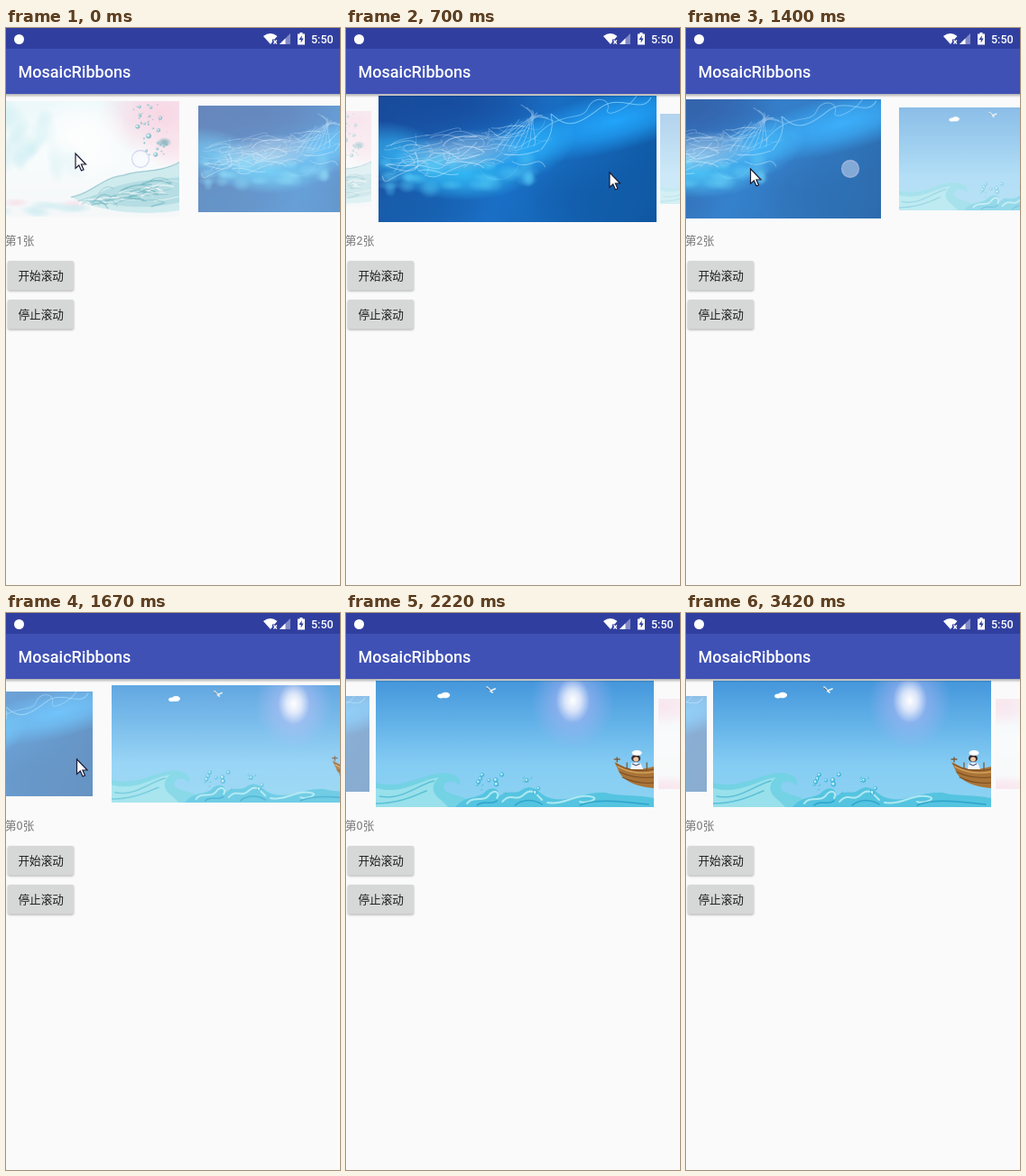
These frames come from a looping animation (370x617 px, 3520 ms). An HTML page with a canvas:

```html
<!DOCTYPE html>
<html lang="zh">
<head>
<meta charset="utf-8">
<title>MosaicRibbons</title>
<style>
  html, body { margin: 0; width: 100%; height: 100%; overflow: hidden; background: #fafafa; }
  canvas, svg { position: absolute; left: 0; top: 0; width: 370px; height: 617px; }
  text { font-family: Roboto, 'Noto Sans CJK SC', 'Noto Sans CJK', sans-serif; }
  .button rect { fill: #d6d7d7; filter: drop-shadow(0 1px 1px rgba(0, 0, 0, .3)); }
  .button text { font-size: 12.6px; fill: #1c1c1c; }
</style>
</head>
<body>
<canvas id="stage" width="370" height="617"></canvas>
<svg viewBox="0 0 370 617">
  <defs>
    <linearGradient id="shade" x2="0" y2="1">
      <stop stop-opacity=".3"/><stop offset="1" stop-opacity="0"/>
    </linearGradient>
  </defs>
  <rect y="73" width="370" height="4" fill="url(#shade)"/>
  <rect y="23" width="370" height="50" fill="#3f51b5"/>
  <rect width="370" height="23" fill="#303f9f"/>
  <g fill="#fff">
    <circle cx="14.5" cy="12.5" r="5.5"/>
    <path d="M285 9Q293 3 300.500 9L297.500 12.500H295V15.500L293 18Z"/>
    <path d="M296.500 13.500l3.500 4m0-4l-3.500 4" stroke="#fff" stroke-width="1.200"/>
    <path d="M303 18L315 6V18Z" opacity=".4"/>
    <path d="M303 18L309.500 11.500V18Z"/>
    <path d="M323 6.500h2.500V5h3v1.500H331V18.500h-8Z"/>
    <path d="M328 8l-3.500 5h2.200v3.500l3-5h-2.200Z" fill="#303f9f"/>
    <text x="338" y="17" font-size="12.500" font-weight="500">5:50</text>
    <text x="13.500" y="55" font-size="18" font-weight="500">MosaicRibbons</text>
  </g>
  <text id="label" x="-1" y="240" font-size="12.600" fill="#777">第1张</text>
  <g class="button">
    <rect x="2" y="258" width="73" height="32.500" rx="2"/>
    <text x="13.500" y="279">开始滚动</text>
  </g>
  <g class="button">
    <rect x="2" y="301" width="73" height="32.500" rx="2"/>
    <text x="13.500" y="322">停止滚动</text>
  </g>
</svg>
<script>
const LOOP = 3520, W = 308, H = 140, MID = 145;
const STEPS = [0, 130, 280, 430, 580, 700, 860, 1010, 1130, 1250, 1400,
  1520, 1670, 1820, 1950, 2100, 2220, 2340, 2490, 2610, 2760, 3420];
const POINTER = [[0, 77, 139], [280, 117, 148], [700, 292, 160], [860, 302, 160],
  [1130, 298, 159], [1250, 235, 158], [1400, 71.5, 156], [1670, 78.5, 162], [1820, 90, 170]];
const TOUCH = { 0: [149, 145, .12], 1250: [290, 157, .45], 1400: [182, 156, .45] };

const stage = document.getElementById('stage').getContext('2d');
const label = document.getElementById('label');
stage.imageSmoothingQuality = 'high';

function random(seed) {
  return () => (seed = (seed * 16807) % 2147483647) / 2147483647;
}

// Paints one card picture and offers small drawing helpers.
function picture(paint) {
  const canvas = document.createElement('canvas');
  canvas.width = W * 2;
  canvas.height = H * 2;
  const c = canvas.getContext('2d');
  c.scale(2, 2);
  c.lineCap = 'round';
  paint({
    wash(x, y, ...colors) {
      const g = c.createLinearGradient(0, 0, x, y);
      colors.forEach((col, i) => g.addColorStop(i / (colors.length - 1), col));
      c.fillStyle = g;
      c.fillRect(0, 0, W, H);
    },
    glow(x, y, rx, ry, color, alpha = 1, turn = 0) {
      c.save();
      c.translate(x, y);
      c.rotate(turn);
      c.scale(rx, ry);
      const g = c.createRadialGradient(0, 0, 0, 0, 0, 1);
      g.addColorStop(0, color);
      g.addColorStop(.45, color + 'b0');
      g.addColorStop(1, color + '00');
      c.globalAlpha = alpha;
      c.fillStyle = g;
      c.fillRect(-1, -1, 2, 2);
      c.restore();
    },
    fill(d, color, alpha = 1) {
      c.globalAlpha = alpha;
      c.fillStyle = color;
      c.fill(new Path2D(d));
      c.globalAlpha = 1;
    },
    line(d, color, width = 1, alpha = 1) {
      c.globalAlpha = alpha;
      c.strokeStyle = color;
      c.lineWidth = width;
      c.stroke(new Path2D(d));
      c.globalAlpha = 1;
    },
    dot(x, y, rx, color, alpha = 1, ry = rx) {
      c.globalAlpha = alpha;
      c.fillStyle = color;
      c.beginPath();
      c.ellipse(x, y, rx, ry, 0, 0, 7);
      c.fill();
      c.globalAlpha = 1;
    }
  });
  return canvas;
}

const water = picture(({ wash, glow, fill, line, dot }) => {
  const rnd = random(41);
  wash(0, H, '#e9f8fa', '#f8fcfd', '#f4f7f9');
  glow(8, 10, 60, 34, '#f8c8dc');
  glow(10, 138, 70, 20, '#f8c8dc');
  glow(285, 15, 75, 55, '#f9cfe0');
  glow(300, 55, 36, 30, '#fbdbe6', .8);
  for (let i = 0; i < 16; i++)
    glow(60 + rnd() * 120, rnd() * 75, 10 + rnd() * 24, 8 + rnd() * 14, '#bfeaf0', .6, rnd() * 3);
  for (let i = 0; i < 12; i++)
    glow(60 + rnd() * 130, 122 + rnd() * 16, 18, 6, i % 3 ? '#c5e9ee' : '#f5d7e2', .7);
  glow(190, 45, 60, 55, '#ffffff');
  fill('M178 116C205 110 216 92 240 90C262 82 282 88 308 74V132C270 138 215 136 178 116Z', '#bfe5ea', .85);
  fill('M200 118C230 98 262 96 308 92V122C270 132 230 128 200 118Z', '#8fcbd4', .55);
  for (let i = 0; i < 44; i++) {
    const x = 184 + rnd() * 95, rise = (x - 180) * .27, y = 118 - rnd() * rise + rnd() * 10;
    const dx = 14 + rnd() * 26;
    line(`M${x} ${y}q${dx / 2} ${-12 + rnd() * 12} ${dx} ${-7 + rnd() * 12}`,
      i % 3 ? '#4fa5b3' : '#ffffff', .5 + rnd() * 1.4, .65);
  }
  line('M178 116C205 110 216 92 240 90C262 82 282 88 308 74', '#68aebb', 1.2, .8);
  for (let i = 0; i < 42; i++) {
    const y = rnd() * 68, x = 262 + y * .3 + (rnd() - .4) * 36, r = .5 + rnd() * rnd() * 3.2;
    dot(x, y, r, '#4aa3b2', .75);
    if (r > 1.2) dot(x - r * .2, y - r * .2, r * .5, '#d8f3f5');
  }
  glow(290, 50, 9, 6, '#348d9e', .7);
});

const smoke = picture(({ wash, glow, line }) => {
  const rnd = random(77);
  wash(W, H, '#194a9a', '#1a70c6', '#0e559f');
  glow(80, 8, 120, 40, '#174a9c', .8);
  glow(262, 28, 125, 34, '#22a8ff', .95, -.25);
  glow(30, 125, 90, 25, '#1761ae', .8);
  glow(250, 115, 90, 42, '#125ca9', .8);
  glow(25, 68, 70, 36, '#35b2f2', .9, .3);
  glow(95, 86, 75, 30, '#32bcf7', .95);
  glow(165, 58, 58, 34, '#2bb0fa', .9, -.4);
  glow(92, 62, 75, 24, '#a8d6f3', .65, -.1);
  for (let i = 0; i < 26; i++)
    glow(8 + rnd() * 160, 70 + rnd() * 34, 6 + rnd() * 12, 4 + rnd() * 7, '#5ad2fb', .4);
  for (let i = 0; i < 70; i++) {
    const x = rnd() * 150, y = 45 + rnd() * 48 - x * .08, n = () => (rnd() - .5) * 46;
    line(`M${x} ${y}c${12 + n() / 2} ${n() * .7} ${24 + n()} ${n() * .7} ${34 + n() / 2} ${n() * .5 - 5}`,
      '#e4f4ff', .4 + rnd() * .8, .2 + rnd() * .35);
  }
  for (let i = 0; i < 7; i++)
    line(`M${130 + i * 7} ${62 - i}C${150 + i * 5} ${20 + i * 4} ${190 - i * 6} ${30 - i * 3} ${158 + i * 6} ${10 + i * 3}`,
      '#cdeaff', .7, .55);
  line('M180 60C205 30 182 12 196 24S222 32 245 14S292 22 302 2', '#9adcff', .9, .75);
  line('M172 48C200 14 225 30 232 14S258 4 254 15S278 14 286 0', '#9adcff', .8, .65);
});

const sky = picture(({ wash, glow, fill, line, dot }) => {
  const rnd = random(19);
  wash(0, H, '#4597dc', '#63b2e8', '#86cdf4', '#8dd3f2');
  glow(218, 24, 46, 52, '#a9b4f4', .75);
  glow(218, 22, 19, 25, '#ffffff');
  dot(72, 17, 4, '#fff', 1, 2.5);
  dot(77, 16, 5, '#fff', 1, 3.2);
  line('M123 7l4 4 5-2M126 11l3 2', '#eef6fa', 1.6);
  line('M123 8l3 3', '#586a78', 1);
  fill('M0 113C28 121 52 103 74 102C88 102 96 109 92 116C86 109 77 110 75 117C73 126 93 125 106 134V140H0Z', '#73d2e4');
  fill('M0 119C30 127 50 109 70 107C60 115 62 125 72 132L80 140H0Z', '#a5e5ee', .75);
  line('M4 128C28 133 45 116 64 111M0 136C28 136 45 126 56 122', '#4db9d3', 1.5, .8);
  fill('M88 140C98 127 112 131 120 124C127 116 138 119 136 128C149 119 153 128 163 120C176 114 180 125 190 129C212 137 230 122 254 124C268 128 288 126 308 130V140Z', '#55c4e0');
  line('M101 136c6-9 18-1 24-9s13-3 9 3M140 134c10-11 14 1 24-8s15 2 20 6M190 135c18 3 30-9 46-7s-4 9-10 6', '#b9eef4', 2, .9);
  line('M112 138c7-6 16 0 22-5M154 138c10-8 22-6 30-1M226 138c18-8 45-4 76-1', '#269fc8', 1.6, .8);
  for (let i = 0; i < 20; i++) {
    const x = 112 + rnd() * 72, y = 104 + rnd() * 22, r = .7 + rnd() * 2.2;
    dot(x, y, r, '#43b7da');
    dot(x - .4, y - .4, r * .5, '#c9f2f7');
  }
  fill('M264 90L276 96C288 99 298 98 308 95V119C292 118 272 112 268 98Z', '#aa7438');
  line('M266 92C278 100 294 101 308 98M270 101c12 6 24 7 38 6M273 107c12 6 24 7 35 6', '#6d431e', 1, .8);
  line('M268 95C282 103 296 103 308 101', '#d3a25c', 1.4);
  line('M267 90v-5M264 87h6M278 97v-6M300 98v-7', '#7b4d22', 1.2);
  dot(288, 86, 5, '#3c2b2b', 1, 4);
  dot(288, 87, 3, '#f0c7a5', 1, 2.6);
  dot(289, 80, 5.5, '#fff', 1, 3);
  fill('M283 91h10l3 7h-14Z', '#f4f6fa');
  line('M284 92l4 2 4-2', '#3a4b78', 1);
});

const cards = [water, smoke, sky];

// Card spacing and size depend on where its near edge stands.
const gap = left => Math.min(21, 1.5 + .18 * left, 50.9 - .133 * left);
const tallByLeft = left => Math.min(H, 144.6 - .128 * left);
const tallByRight = right => Math.min(H, 102.5 + .137 * right);

// Steady drag up to the release, then an exponential settle.
function glide(t, t0, x0, speed) {
  return t < t0 ? x0 + (t0 - t) * speed : 30 + (x0 - 30) * Math.exp((t0 - t) / 167);
}

function drawCard(i, left, tall) {
  stage.globalAlpha = 1 - .0152 * (H - tall);
  stage.drawImage(cards[(i + 3) % 3], left, MID - tall / 2, tall * W / H, tall);
  stage.globalAlpha = 1;
}

function drawGallery(t) {
  const second = t >= 1250;
  const index = second ? 2 : 1;
  let left = !second ? glide(t, 280, 103, .393)
    : t < 1400 ? 344 - (t - 1250) * .72 : glide(t, 1670, 117, .44);
  let tall = tallByLeft(left);
  drawCard(index, left, tall);

  const next = (left + tall * W / H + 50.9) / 1.133;
  if (next < 370) drawCard(index + 1, next, tallByLeft(next));

  for (let i = index - 1; i >= index - 2; i--) {
    const right = left - gap(left);
    if (right <= 0) break;
    tall = tallByRight(right);
    left = right - tall * W / H;
    drawCard(i, left, tall);
  }
}

function drawTouch(t) {
  if (!TOUCH[t]) return;
  const [x, y, alpha] = TOUCH[t];
  stage.beginPath();
  stage.arc(x, y, 9.5, 0, 7);
  stage.fillStyle = `rgba(235,240,255,${alpha})`;
  stage.strokeStyle = 'rgba(190,195,232,.6)';
  stage.lineWidth = 1.3;
  stage.fill();
  stage.stroke();
}

const arrow = new Path2D('M0 0V16.500L3.800 13L6.500 19L9 18L6.400 12H11.500Z');

function drawPointer(t) {
  const n = POINTER.findIndex(p => p[0] >= t);
  if (n < 0) return;
  const b = POINTER[n], a = POINTER[Math.max(0, n - 1)];
  const k = n ? (t - a[0]) / (b[0] - a[0]) : 0;
  stage.save();
  stage.translate(a[1] + (b[1] - a[1]) * k, a[2] + (b[2] - a[2]) * k);
  stage.fillStyle = '#fff';
  stage.strokeStyle = '#1a1c33';
  stage.lineWidth = 1.2;
  stage.fill(arrow);
  stage.stroke(arrow);
  stage.restore();
}

function render(now) {
  const time = now % LOOP;
  const t = STEPS.filter(s => s <= time).pop();
  stage.clearRect(0, 0, 370, 617);
  drawGallery(t);
  drawTouch(t);
  drawPointer(t);
  label.textContent = `第${t < 130 ? 1 : t < 1520 ? 2 : 0}张`;
}

const start = performance.now();
function tick() {
  render(performance.now() - start);
  requestAnimationFrame(tick);
}
tick();
</script>
</body>
</html>
```
